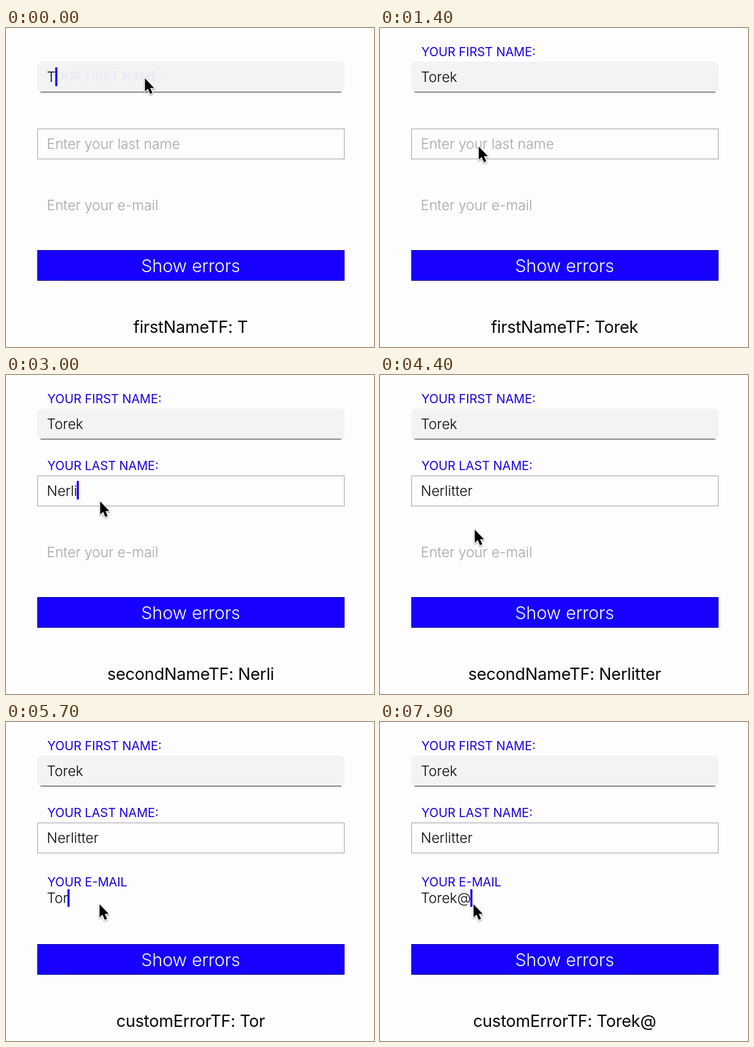
Write an HTML page that moves like this. It is 600x520 px and loops after 8 s.

```html
<!DOCTYPE html>
<html lang="en">
<head>
<meta charset="utf-8">
<title>Text fields</title>
<style>
html, body { margin: 0; width: 100%; height: 100%; overflow: hidden; background: #fefdfe; }
svg { display: block; width: 600px; height: 520px; font-family: Inter, "Open Sans", sans-serif; }
.hint, .value { font-size: 22.8px; font-weight: 350; }
.hint { fill: #a4a4a8; }
.value { fill: #050505; }
.label { font-size: 19.85px; fill: #1700dc; }
.caret { fill: #1800f0; }
.button { font-size: 28.8px; font-weight: 350; letter-spacing: -0.12px; fill: #fff; text-anchor: middle; }
.status { font-size: 27.1px; letter-spacing: -0.22px; fill: #050505; text-anchor: middle; }
</style>
</head>
<body>
<svg viewBox="0 0 600 520">
  <defs>
    <clipPath id="round"><rect x="51" y="55" width="501" height="50.2" rx="8"/></clipPath>
    <filter id="shadow" x="-50%" y="-50%" width="200%" height="200%">
      <feDropShadow dx="0" dy="1.5" stdDeviation="1.3" flood-color="#000" flood-opacity="0.4"/>
    </filter>
  </defs>
  <rect width="600" height="520" fill="#fefdfe"/>
  <g clip-path="url(#round)">
    <rect x="51" y="55" width="501" height="51" fill="#f3f2f4"/>
    <rect x="51" y="104" width="501" height="1" fill="#2f2f33"/>
  </g>
  <rect x="51.5" y="164.5" width="500" height="49" fill="none" stroke="#a0a0a8"/>
  <rect x="51.5" y="362.5" width="500" height="49" fill="#1700ff" stroke="#0c0090"/>
  <text class="button" x="301" y="398">Show errors</text>
  <g id="fields"></g>
  <text id="status" class="status" x="301" y="497.3"></text>
  <g id="pointer" filter="url(#shadow)">
    <path d="M0.5 1V22.4L5.3 18L9 26.4L12.8 24.8L9.1 16.7H15.5Z" fill="#000"
      stroke="#fff" stroke-width="2.6" stroke-linejoin="round" paint-order="stroke"/>
  </g>
</svg>
<script>
const LOOP = 8000;
const RISE = 250;
const LEFT = 66.6;

const $ = id => document.getElementById(id);

function add(parent, tag, attrs, text = "") {
  const el = document.createElementNS("http://www.w3.org/2000/svg", tag);
  for (const key in attrs) el.setAttribute(key, attrs[key]);
  el.textContent = text;
  parent.append(el);
  return el;
}

// keys: moment each character is typed; focus: moment the field is tapped
const fields = [
  { id: "firstNameTF", hint: "Enter your first name", label: "YOUR FIRST NAME:", text: "Torek",
    focus: -500, keys: [-10, 190, 370, 530, 700],
    hintY: 88, valueY: 88, from: 87.5, to: 45.5, caretY: 64, caretH: 31 },
  { id: "secondNameTF", hint: "Enter your last name", label: "YOUR LAST NAME:", text: "Nerlitter",
    focus: 1650, keys: [2255, 2430, 2600, 2780, 2960, 3130, 3270, 3420, 3570],
    hintY: 197.3, valueY: 197, from: 196.5, to: 154.5, caretY: 172.5, caretH: 30.5 },
  { id: "customErrorTF", hint: "Enter your e-mail", label: "YOUR E-MAIL", text: "Torek@",
    focus: 5000, keys: [5450, 5550, 5650, 5790, 6050, 7800],
    hintY: 297, valueY: 295.2, from: 296.5, to: 268.2, caretY: 272.5, caretH: 29 }
];

for (const f of fields) {
  const g = add($("fields"), "g", {});
  f.hintEl = add(g, "text", { class: "hint", x: LEFT, y: f.hintY }, f.hint);
  f.labelEl = add(g, "text", { class: "label", x: 67.5 }, f.label);
  f.valueEl = add(g, "text", { class: "value", x: LEFT, y: f.valueY });
  f.caretEl = add(g, "rect", { class: "caret", y: f.caretY, width: 3.4, height: f.caretH, rx: 1 });
}

// pointer stops: time, x, y
const stops = [
  [0, 226, 81], [1000, 226, 81], [1500, 153, 205], [3900, 153, 205],
  [4300, 154, 251], [4500, 154, 251], [4850, 152, 296], [LOOP, 152, 296]
];

const clamp = v => Math.max(0, Math.min(1, v));
const smooth = v => v * v * (3 - 2 * v);

function pointerAt(t) {
  const i = Math.max(1, stops.findIndex(s => s[0] > t));
  const [t0, x0, y0] = stops[i - 1], [t1, x1, y1] = stops[i];
  const p = smooth(clamp((t - t0) / (t1 - t0)));
  return [x0 + (x1 - x0) * p, y0 + (y1 - y0) * p];
}

function drawField(f, t, active) {
  const typed = f.keys.filter(k => k <= t);
  const rise = clamp((t - f.keys[0]) / RISE);
  const last = typed.length ? typed[typed.length - 1] : f.focus;
  const value = f.text.slice(0, typed.length);

  f.hintEl.setAttribute("visibility", value ? "hidden" : "visible");
  f.valueEl.textContent = value;
  f.labelEl.setAttribute("y", f.from + (f.to - f.from) * rise);
  f.labelEl.setAttribute("opacity", rise);

  const lit = active && (t - last) % 1000 < 600;
  f.caretEl.setAttribute("visibility", lit ? "visible" : "hidden");
  f.caretEl.setAttribute("x", LEFT - 0.8 + (value ? f.valueEl.getComputedTextLength() : 0));
  if (active) $("status").textContent = f.id + ": " + (value || "did begin editing");
}

function draw(t) {
  const active = fields.filter(f => f.focus <= t).pop();
  for (const f of fields) drawField(f, t, f === active);
  $("pointer").setAttribute("transform", `translate(${pointerAt(t)})`);
}

const start = performance.now();
function tick(now) {
  draw(Math.max(0, now - start) % LOOP);
  requestAnimationFrame(tick);
}
draw(0);
requestAnimationFrame(tick);
</script>
</body>
</html>
```
